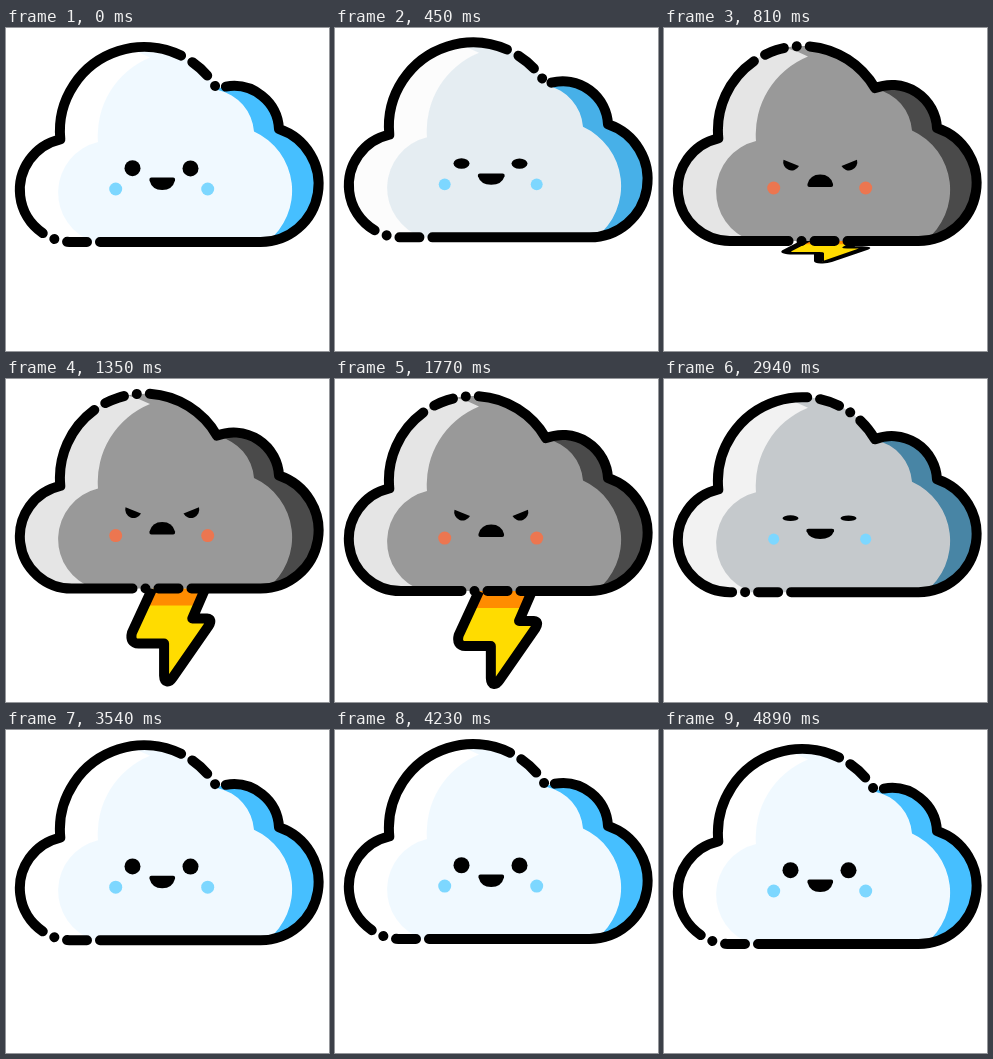
An HTML page for the animation above (4920 ms loop, 323x323 px).

```html
<!DOCTYPE html>
<html lang="en">
<head>
<meta charset="utf-8">
<title>Moody cloud</title>
<style>
  html, body { margin: 0; width: 100%; height: 100%; overflow: hidden; background: #fff; }
  svg { display: block; width: 100vw; height: 100vh; }
  .line { fill: none; stroke: #000; stroke-width: 10; stroke-linecap: round; stroke-linejoin: round; }
  #bolt .line { stroke-linecap: butt; }
</style>
</head>
<body>
<svg viewBox="0 0 323 323">
  <defs>
    <path id="shape" d="M254.5 214H66A52 52 0 0 1 54.3 111.3A84.2 84.2 0 0 1 211 61.1A45.4 45.4 0 0 1 273 101A58 58 0 0 1 254.5 214Z"/>
    <path id="zigzag" d="M143.5 214L123.2 258Q120.5 268.5 130 269H155.3V301C155.5 308 160 309 164 303L200 251Q204 244.5 198 244H183.5L196.5 214"/>
    <path id="glare" d="M119.5 132.8L135 139A8.4 8.4 0 0 1 119.5 132.8Z"/>
    <clipPath id="inside"><use href="#shape"/></clipPath>
  </defs>
  <g id="cloud">
    <g id="bolt">
      <use href="#zigzag" fill="#ffdc00"/>
      <path fill="#ff8c00" d="M143.5 214L135.6 231H189L196.5 214Z"/>
      <use href="#zigzag" class="line"/>
    </g>
    <g clip-path="url(#inside)">
      <rect id="body" width="323" height="323"/>
      <path id="light" d="M88 214A52 52 0 0 1 92 114A84 84 0 0 1 144 29.5Q133 24 122 21L110 0H0V214Z"/>
      <path id="shade" d="M212 62A46 46 0 0 1 248 103.5A65 65 0 0 1 261 214H323V0H212Z"/>
    </g>
    <use id="outline" class="line" href="#shape"/>
    <g id="cheeks">
      <circle cx="109.7" cy="161"/>
      <circle cx="201.7" cy="161"/>
    </g>
    <g id="calm">
      <g class="eyes">
        <circle cx="126.5" cy="140.2" r="8"/>
        <circle cx="184.5" cy="140.4" r="8"/>
      </g>
      <path class="mouth" d="M145.5 149.5H167Q169.5 149.5 169 152.5Q166.5 162 156.2 162Q146 162 143.5 152.5Q143 149.5 145.5 149.5Z"/>
    </g>
    <g id="angry">
      <g class="eyes">
        <use href="#glare"/>
        <use href="#glare" transform="translate(312.5 0) scale(-1 1)"/>
      </g>
      <path class="mouth" d="M145.5 160H167Q169.5 160 169 157Q166.5 147.5 156.2 147.5Q146 147.5 143.5 157Q143 160 145.5 160Z"/>
    </g>
  </g>
</svg>
<script>
const LOOP = 4920, CALM_TO_ANGRY = 580, ANGRY_TO_CALM = 2870;
const $ = id => document.getElementById(id);
const all = selector => document.querySelectorAll(selector);
const clamp = v => Math.max(0, Math.min(1, v));
const ease = u => (1 - Math.cos(Math.PI * u)) / 2;
const ramp = (t, start, span) => clamp((t - start) / span);
const mix = (a, b, u) => a + (b - a) * u;
const scaleAt = (x, y, sx, sy) =>
  `translate(${x} ${y}) scale(${sx} ${sy}) translate(${-x} ${-y})`;
const show = (id, on) => $(id).setAttribute('visibility', on ? 'visible' : 'hidden');

const COLORS = {
  body: [[240, 249, 255], [153, 153, 153]],
  light: [[255, 255, 255], [229, 229, 229]],
  shade: [[70, 191, 255], [74, 74, 74]]
};

// Two long strokes, each followed by the same gap, dash, gap, dot, gap.
const GAP = 13, DASH = 20, TOP_LINE = 299, PATTERN_START = 160.5;
const accent = [GAP, DASH, GAP, 0.01, GAP];
const baseLine = $('shape').getTotalLength() - TOP_LINE - 2 * accent.reduce((a, b) => a + b);
$('outline').setAttribute('stroke-dasharray',
  [0, ...accent, TOP_LINE, ...accent, baseLine, 0].join(' '));

// Counts half swings: slow when calm, quick through the storm.
const swings = t => ramp(t, 0, 560) + 8 * ramp(t, 560, 2830)
  + 2 * ramp(t, 3390, 890) + ramp(t, 4280, 640);

function draw(t) {
  const lift = 5.1 * ease(swings(t));
  $('cloud').setAttribute('transform', `translate(0 ${-lift})`);

  const slide = ease(ramp(t, 394, 460)) - ease(ramp(t, 2670, 460));
  $('outline').setAttribute('stroke-dashoffset', 91.5 * slide - PATTERN_START);

  const mood = ramp(t, 400, 400) - ramp(t, 2700, 480);
  for (const [id, [calm, angry]] of Object.entries(COLORS))
    $(id).setAttribute('fill', `rgb(${calm.map((c, i) => Math.round(mix(c, angry[i], mood)))})`);

  const strike = ease(ramp(t, 730, 250)) - ease(ramp(t, 2400, 240));
  show('bolt', strike > 0.01);
  $('bolt').setAttribute('transform',
    `translate(${0.9 * lift - 1.2} 0) ${scaleAt(160, 213, 1, strike)}`);

  // The face squeezes shut around each change of mood.
  const isAngry = t >= CALM_TO_ANGRY && t < ANGRY_TO_CALM;
  const open = clamp(Math.min(Math.abs(t - CALM_TO_ANGRY), Math.abs(t - ANGRY_TO_CALM)) / 200);
  show('calm', !isAngry);
  show('angry', isAngry);
  for (const eyes of all('.eyes'))
    eyes.setAttribute('transform', scaleAt(156, 140, 1, open));
  for (const mouth of all('.mouth'))
    mouth.setAttribute('transform', scaleAt(156.2, 155.5, mix(1.12, 1, open), mix(0.7, 1, open)));
  $('cheeks').setAttribute('fill', isAngry ? '#ec7650' : '#7dd7ff');
  for (const cheek of $('cheeks').children)
    cheek.setAttribute('r', mix(5, 6.5, open));
}

function frame() {
  draw(performance.now() % LOOP);
  requestAnimationFrame(frame);
}
frame();
</script>
</body>
</html>
```
